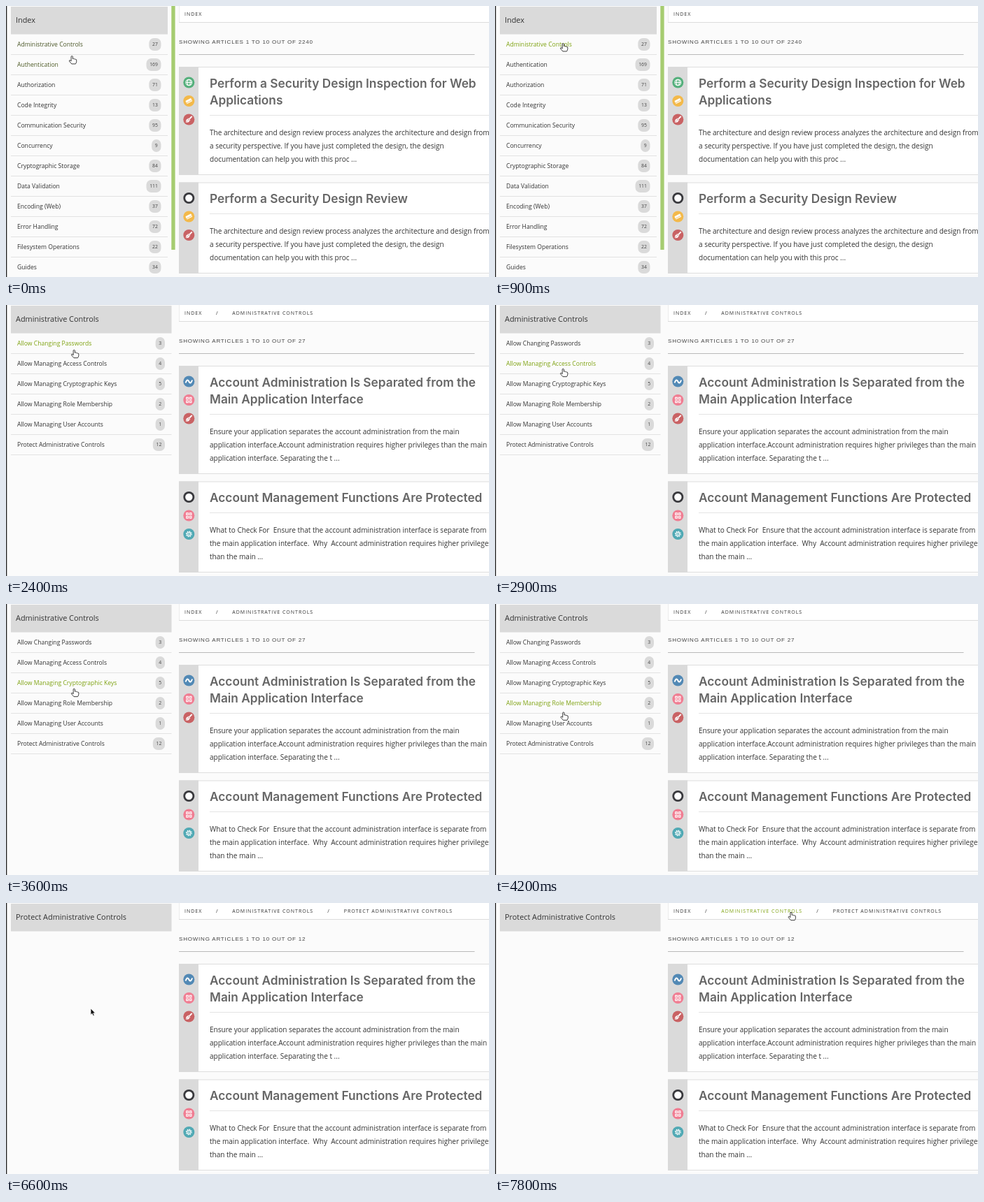
An HTML page for the animation above (8 s loop, 690 by 388 pixels).

```html
<!DOCTYPE html>
<html lang="en">
<head>
<meta charset="utf-8">
<title>Article index</title>
<style>
html, body { margin: 0; width: 100%; height: 100%; overflow: hidden; background: #fbfbfb; }
svg { display: block; width: 100%; height: 100%; }
text { font-family: "Open Sans", "Noto Sans", sans-serif; fill: #333; white-space: pre; }
.item { font-size: 8.6px; }
.head { font-size: 10.88px; }
.badge { font-size: 6.8px; text-anchor: middle; fill: #444; }
.crumb { font-size: 7px; letter-spacing: 1px; }
.count { font: 8px "Liberation Sans", Arial, sans-serif; letter-spacing: .8px; fill: #444; }
.title { font: 600 17.25px Inter, Roboto, sans-serif; fill: #666; }
.body { font-size: 10.04px; }
.ink { fill: none; stroke: #fff; stroke-width: 1.1; }
.thick { stroke-width: 2; }
</style>
</head>
<body>
<svg id="stage" viewBox="0 0 690 388"></svg>
<script>
const LOOP = 8000, STEP = 100, FADE = 250;
const DARK = [51, 51, 51], GREEN = [126, 162, 16];
const stage = document.getElementById('stage');

function add(parent, tag, attrs, label) {
  const el = document.createElementNS('http://www.w3.org/2000/svg', tag);
  for (const key in attrs) el.setAttribute(key, attrs[key]);
  if (label !== undefined) el.textContent = label;
  return parent.appendChild(el);
}
const rect = (p, x, y, width, height, fill, more) => add(p, 'rect', { x, y, width, height, fill, ...more });
const text = (p, cls, x, y, label) => add(p, 'text', { class: cls, x, y }, label);

// White glyphs centred on each round icon
const icons = {
  globe: ['#55b07c', '<circle class="ink" r="4.3"/><ellipse class="ink" rx="1.9" ry="4.3"/><path class="ink" d="M-4.3 0H4.3"/>'],
  eraser: ['#f3b94a', '<g transform="rotate(-28)"><rect x="-4.4" y="-2.4" width="8.8" height="4.8" rx=".8" fill="#fff"/><path d="M-4.4 .9H4.4" stroke="#f3b94a" stroke-width=".7"/></g>'],
  brush: ['#c96264', '<path class="ink thick" d="M4.4-4.6L.6-.6"/><path fill="#fff" d="M-1-2L2 1L-.9 4L-4.6 4.2L-3.8 .6Z"/><path stroke="#c96264" stroke-width=".7" d="M-1.9-1.1L1.1 1.9M-4 3.6L-1.6 1.4"/>'],
  wave: ['#5289b5', '<path class="ink thick" d="M-4.8 2Q-2.2-5 0 0T4.8-2"/>'],
  grid: ['#f07d92', '<path class="ink" d="M-3.6-3.6h2.6v2.6h-2.6ZM1-3.6h2.6v2.6H1ZM-3.6 1h2.6v2.6h-2.6ZM1 1h2.6v2.6H1Z"/>'],
  gear: ['#50a9b4', '<circle class="ink" r="2.6"/><circle class="ink" r="3.9" stroke-dasharray="1.5 1.56"/><circle r=".9" fill="#fff"/>'],
  ring: ['#39393d', '<circle r="5.2" fill="#fff"/>']
};

function icon(parent, name, y) {
  const [color, glyph] = icons[name];
  const g = add(parent, 'g', { transform: `translate(261.3 ${y})` });
  add(g, 'circle', { r: 8, fill: color });
  g.insertAdjacentHTML('beforeend', glyph);
}

function card(parent, y, height, { title, body, marks }) {
  rect(parent, 247.5, y + .5, 460, height, '#fff', { stroke: '#dedede' });
  rect(parent, 247, y, 28, height + 1, '#dadada');
  marks.forEach((m, i) => icon(parent, m, y + 22.5 + i * 26.5));
  title.forEach((line, i) => text(parent, 'title', 291, y + 29.5 + i * 24.5, line));
  const rule = Math.round(y + 20 + title.length * 24.5);
  rect(parent, 291, rule, 399, 1, '#e4e4e4');
  body.forEach((line, i) => text(parent, 'body', 291, rule + 29 + i * 19.2, line));
}

const links = [];
const hover = (el, ...spans) => links.push({ el, spans });

function page({ head, items = [], right, total, crumbs, cards, bar }) {
  const g = add(stage, 'g', {});
  rect(g, 7, 1, right - 7, 39.5, '#dadada');
  text(g, 'head', 14, 23.8, head);
  const rows = items.map(([label, count], i) => {
    const y = 55 + i * 29, w = 9.6 + 3.8 * String(count).length, edge = right - 9.5;
    rect(g, 7, y + 14, right - 7, 1, '#e2e2e2');
    rect(g, edge - w, y - 9, w, 18, '#dadada', { rx: 7 });
    text(g, 'badge', edge - w / 2, y + 2.4, count);
    return text(g, 'item', 16, y + 2.8, label);
  });
  if (bar) rect(g, 236.3, 0, 5.3, 349, '#a6cc70');

  rect(g, 247, 0, 443, 23, '#fff');
  rect(g, 247, 23, 443, 1, '#dcdcdc');
  rect(g, 247, 0, 1, 23, '#ececec');
  const xs = [255, 323.3, 482.7];
  const trail = crumbs.map((label, i) => {
    if (i) text(g, 'crumb', [300, 459.3][i - 1], 14.3, '/');
    return text(g, 'crumb', xs[i], 14.3, label);
  });
  text(g, 'count', 247, 54.4, `SHOWING ARTICLES 1 TO 10 OUT OF ${total}`);
  rect(g, 247, 69, 422.5, 1, '#b9b9b9');
  card(g, 87, 154, cards[0]);
  card(g, 252.5, 129.5, cards[1]);
  return { g, rows, trail };
}

const review = 'The architecture and design review process analyzes the architecture and design from';
const proc = [review, 'a security perspective. If you have just completed the design, the design', 'documentation can help you with this proc ...'];
const indexCards = [
  { title: ['Perform a Security Design Inspection for Web', 'Applications'], body: proc, marks: ['globe', 'eraser', 'brush'] },
  { title: ['Perform a Security Design Review'], body: proc, marks: ['ring', 'eraser', 'brush'] }
];
const adminCards = [
  { title: ['Account Administration Is Separated from the', 'Main Application Interface'],
    body: ['Ensure your application separates the account administration from the main',
      'application interface.Account administration requires higher privileges than the main',
      'application interface. Separating the t ...'],
    marks: ['wave', 'grid', 'brush'] },
  { title: ['Account Management Functions Are Protected'],
    body: ['What to Check For  Ensure that the account administration interface is separate from',
      'the main application interface.  Why  Account administration requires higher privileges',
      'than the main ...'],
    marks: ['ring', 'grid', 'gear'] }
];

const index = page({
  head: 'Index', right: 231, total: 2240, crumbs: ['INDEX'], cards: indexCards, bar: true,
  items: [['Administrative Controls', 27], ['Authentication', 169], ['Authorization', 71],
    ['Code Integrity', 13], ['Communication Security', 95], ['Concurrency', 9],
    ['Cryptographic Storage', 84], ['Data Validation', 111], ['Encoding (Web)', 37],
    ['Error Handling', 72], ['Filesystem Operations', 22], ['Guides', 34]]
});
const admin = page({
  head: 'Administrative Controls', right: 236.5, total: 27,
  crumbs: ['INDEX', 'ADMINISTRATIVE CONTROLS'], cards: adminCards,
  items: [['Allow Changing Passwords', 3], ['Allow Managing Access Controls', 4],
    ['Allow Managing Cryptographic Keys', 5], ['Allow Managing Role Membership', 2],
    ['Allow Managing User Accounts', 1], ['Protect Administrative Controls', 12]]
});
const protect = page({
  head: 'Protect Administrative Controls', right: 236.5, total: 12,
  crumbs: ['INDEX', 'ADMINISTRATIVE CONTROLS', 'PROTECT ADMINISTRATIVE CONTROLS'], cards: adminCards
});
rect(stage, 0, 0, 1.3, 388, '#222');

hover(index.rows[0], [-600, -170], [350, 1500]);
hover(index.rows[1], [-90, 350]);
[1500, 2500, 3075, 3710, 4260, 4700, 5600].forEach((t, i, all) => {
  if (i < 6) hover(admin.rows[i], [t, all[i + 1]]);
});
hover(protect.trail[1], [7500, LOOP]);

const hand = add(stage, 'path', {
  d: 'M-1.2 1Q0-.6 1.2 1V4.6Q2.4 3.8 3.4 5Q4.6 4.4 5.4 5.6Q7 5 7 7V9Q6.6 11 5.6 12.5H-.4Q-2 10.6-4 8.4Q-4.4 6.4-2.6 7L-1.2 8.2Z',
  fill: '#fff', stroke: '#222', 'stroke-width': .95, 'stroke-linejoin': 'round'
});
const arrow = add(stage, 'path', {
  d: 'M0 0V9.2L2.1 7.3L3.6 10.6L5.2 9.9L3.8 6.7H6.6Z',
  fill: '#111', stroke: '#fff', 'stroke-width': .7
});

// Pointer tip: time, x, y
const path = [
  [0, 94.2, 71.3], [200, 94.2, 71.3], [500, 96, 64], [900, 97.3, 53.3],
  [2200, 97.3, 53.3], [2900, 97.3, 91], [3600, 97.3, 121], [4900, 98.4, 194], [5000, 98.6, 196],
  [6500, 98.6, 196], [6600, 121, 151], [6800, 270, 82], [7000, 452, 42], [7200, 430, 41],
  [7400, 430, 41], [7500, 427, 28], [7600, 424, 18], [7700, 423, 14], [7800, 423, 13], [LOOP, 423, 13]
];

function tipAt(t) {
  const i = Math.max(1, path.findIndex(p => p[0] >= t));
  const [t0, x0, y0] = path[i - 1], [t1, x1, y1] = path[i];
  const k = (t - t0) / (t1 - t0);
  return [x0 + (x1 - x0) * k, y0 + (y1 - y0) * k];
}

const clamp = v => Math.min(1, Math.max(0, v));
const show = (el, on) => { el.style.display = on ? '' : 'none'; };

function draw(now) {
  const t = Math.floor((now % LOOP) / STEP) * STEP;
  show(index.g, t < 1500);
  show(admin.g, t >= 1500 && t < 5600);
  show(protect.g, t >= 5600);
  for (const { el, spans } of links) {
    const k = spans.reduce((sum, [a, b]) => sum + clamp((t - a) / FADE) - clamp((t - b) / FADE), 0);
    el.style.fill = `rgb(${DARK.map((c, i) => Math.round(c + (GREEN[i] - c) * clamp(k)))})`;
  }
  const tip = `translate(${tipAt(t)})`;
  const pointing = t < 5600 || t >= 7600;
  show(hand, pointing);
  show(arrow, !pointing);
  hand.setAttribute('transform', tip + ' scale(.93)');
  arrow.setAttribute('transform', tip);
}

const start = performance.now();
function tick() {
  draw(performance.now() - start);
  requestAnimationFrame(tick);
}
tick();
</script>
</body>
</html>
```
